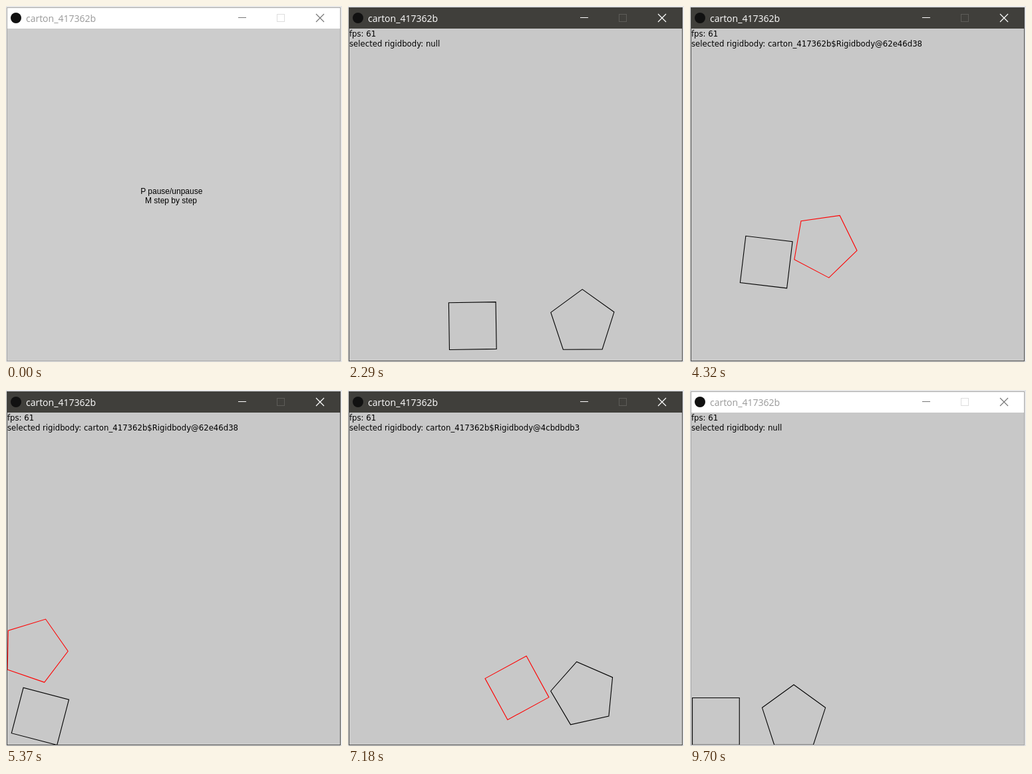
An HTML page for the animation above (9.77 s loop, 505 by 536 pixels).

```html
<!DOCTYPE html>
<html lang="en">
<head>
<meta charset="utf-8">
<style>
  html, body { margin: 0; width: 505px; height: 536px; overflow: hidden; background: #e6e6e6; }
  svg { display: block; }
  polygon { fill: none; stroke-width: 1.1; }
  .title { font: 14px "Open Sans", "Noto Sans", sans-serif; }
  .hint { font: 12px "Liberation Sans", Arial, sans-serif; text-anchor: middle; }
  .info { font: 11.7px "DejaVu Sans", sans-serif; }
</style>
</head>
<body>
<svg width="505" height="536" viewBox="0 0 505 536">
  <defs><clipPath id="inside"><rect x="2" y="34" width="500" height="500"/></clipPath></defs>
  <rect id="frame" x="1.5" y="2.5" width="501" height="532"/>
  <rect id="bar" x="2" y="3" width="500" height="31"/>
  <circle cx="15" cy="18" r="8" fill="#111"/>
  <text id="title" class="title" x="30" y="24">carton_417362b</text>
  <g id="buttons" fill="none">
    <path d="M349 17.5h12"/>
    <path d="M466 12l12 12m0-12l-12 12" stroke-width="1.2"/>
  </g>
  <rect id="maximise" x="407.5" y="12.5" width="11" height="11" fill="none"/>
  <rect id="canvas" x="2" y="34" width="500" height="500"/>
  <g id="hint" class="hint">
    <text x="248.8" y="283">P pause/unpause</text>
    <text x="248" y="297">M step by step</text>
  </g>
  <g id="world" clip-path="url(#inside)">
    <text id="fps" class="info" x="2" y="46"></text>
    <text id="selected" class="info" x="2" y="61"></text>
    <polygon id="square"/>
    <polygon id="pentagon"/>
  </g>
</svg>
<script>
const LOOP = 9770, STEP = 70, FOCUS = 350, START = 750, LANDING = 1621, BLUR = 9630;
const RADIUS = 50, FLOOR = 534.2, LEFT = 1.5, RIGHT = 501.5, DROP_FROM = 133.5, GRAVITY = 922;
const OWNER = "carton_417362b$Rigidbody@";
const $ = id => document.getElementById(id);
const easeOut = u => 1 - (1 - u) ** 2;
const mix = (a, b, u) => a + (b - a) * u;

// A pose is reached at `time`; `lift` is the height of the arc leading to it.
const pose = (time, x, y, angle, lift = 0) => ({ time, x, y, angle, lift });

// Lying flat on the floor after a number of part turns.
const flat = (sides, time, x, turns = 0, lift = 0) => pose(
  time, x, FLOOR - RADIUS * Math.cos(Math.PI / sides),
  90 - 180 / sides + turns * 360 / sides, lift);

const square = {
  id: "square", sides: 4, hash: "4cbdbdb3", held: [6700, 7800],
  path: [
    pose(LANDING, 151, 484, 0),
    flat(4, 2400, 188, 0, 35),
    flat(4, 2710, 194),
    pose(3200, 461.4, 397.2, 38.3, 60),
    pose(4200, 130, 360, 50, 75),
    pose(5370, 51.4, 491.4, 59.6),
    flat(4, 5720, 55.5),
    flat(4, 6550, 55.5),
    pose(7180, 254, 448.5, 16.4),
    flat(4, 7900, 263.8),
    flat(4, 8340, 263.8),
    flat(4, 9500, 38.9)
  ]
};
const pentagon = {
  id: "pentagon", sides: 5, hash: "62e46d38", held: [2780, 5850],
  path: [
    pose(LANDING, 352, 484, 36),
    flat(5, 2400, 352.5, 0, 35),
    flat(5, 2710, 353),
    pose(3200, 455, 478.3, 94),
    pose(4200, 240, 370, 84),
    pose(5370, 43.2, 392.3, 73.1, 40),
    flat(5, 6550, 160, 1),
    pose(7180, 354.5, 458, 113.5),
    pose(7650, 457, 456, 115),
    pose(8230, 380.9, 453.3, 113.7),
    flat(5, 9560, 156, -2)
  ]
};

function poseAt(path, t) {
  const first = path[0];
  if (t < first.time) {
    const seconds = (t - START) / 1000;
    return { ...first, y: DROP_FROM + GRAVITY / 2 * seconds ** 2 };
  }
  const next = path.findIndex(p => p.time > t);
  if (next < 0) return path[path.length - 1];
  const a = path[next - 1], b = path[next];
  const u = (t - a.time) / (b.time - a.time), e = easeOut(u);
  return {
    x: mix(a.x, b.x, e),
    y: mix(a.y, b.y, e) - b.lift * 4 * u * (1 - u),
    angle: mix(a.angle, b.angle, e)
  };
}

const isHeld = (body, t) => t >= body.held[0] && t < body.held[1];

function drawBody(body, t) {
  const { x, y, angle } = poseAt(body.path, t);
  const corners = Array.from({ length: body.sides }, (_, i) => {
    const a = (angle + i * 360 / body.sides) * Math.PI / 180;
    return [RADIUS * Math.cos(a), RADIUS * Math.sin(a)];
  });
  const xs = corners.map(c => c[0]), ys = corners.map(c => c[1]);
  const cx = Math.max(LEFT - Math.min(...xs), Math.min(RIGHT - Math.max(...xs), x));
  const cy = Math.min(FLOOR + .4 - Math.max(...ys), y);
  const shape = $(body.id);
  shape.setAttribute("points", corners.map(c => `${cx + c[0]},${cy + c[1]}`).join(" "));
  shape.setAttribute("stroke", isHeld(body, t) ? "#f00" : "#000");
}

function drawWindow(focused, running) {
  const paint = (id, name, on, off) => $(id).setAttribute(name, focused ? on : off);
  paint("frame", "fill", "#403f3b", "#fff");
  paint("frame", "stroke", "#4a4a48", "#a6a6a6");
  paint("bar", "fill", "#403f3b", "#fff");
  paint("title", "fill", "#fff", "#999");
  paint("buttons", "stroke", "#fff", "#777");
  paint("maximise", "stroke", "#5d5c58", "#dedede");
  $("canvas").setAttribute("fill", running ? "#c8c8c8" : "#ccc");
  $("hint").style.display = running ? "none" : "";
  $("world").style.display = running ? "" : "none";
}

function render(time) {
  const running = time >= START;
  drawWindow(time >= FOCUS && time < BLUR, running);
  if (!running) return;
  const origin = time < 6550 ? START : 7180;
  const t = origin + Math.floor((time - origin) / STEP) * STEP;
  const bodies = [square, pentagon];
  const held = bodies.find(body => isHeld(body, t));
  $("fps").textContent = "fps: " + (t < START + 1000 ? 1 : 61);
  $("selected").textContent = "selected rigidbody: " + (held ? OWNER + held.hash : "null");
  bodies.forEach(body => drawBody(body, t));
}

const begin = performance.now();
function tick() {
  render((performance.now() - begin) % LOOP);
  requestAnimationFrame(tick);
}
tick();
</script>
</body>
</html>
```
